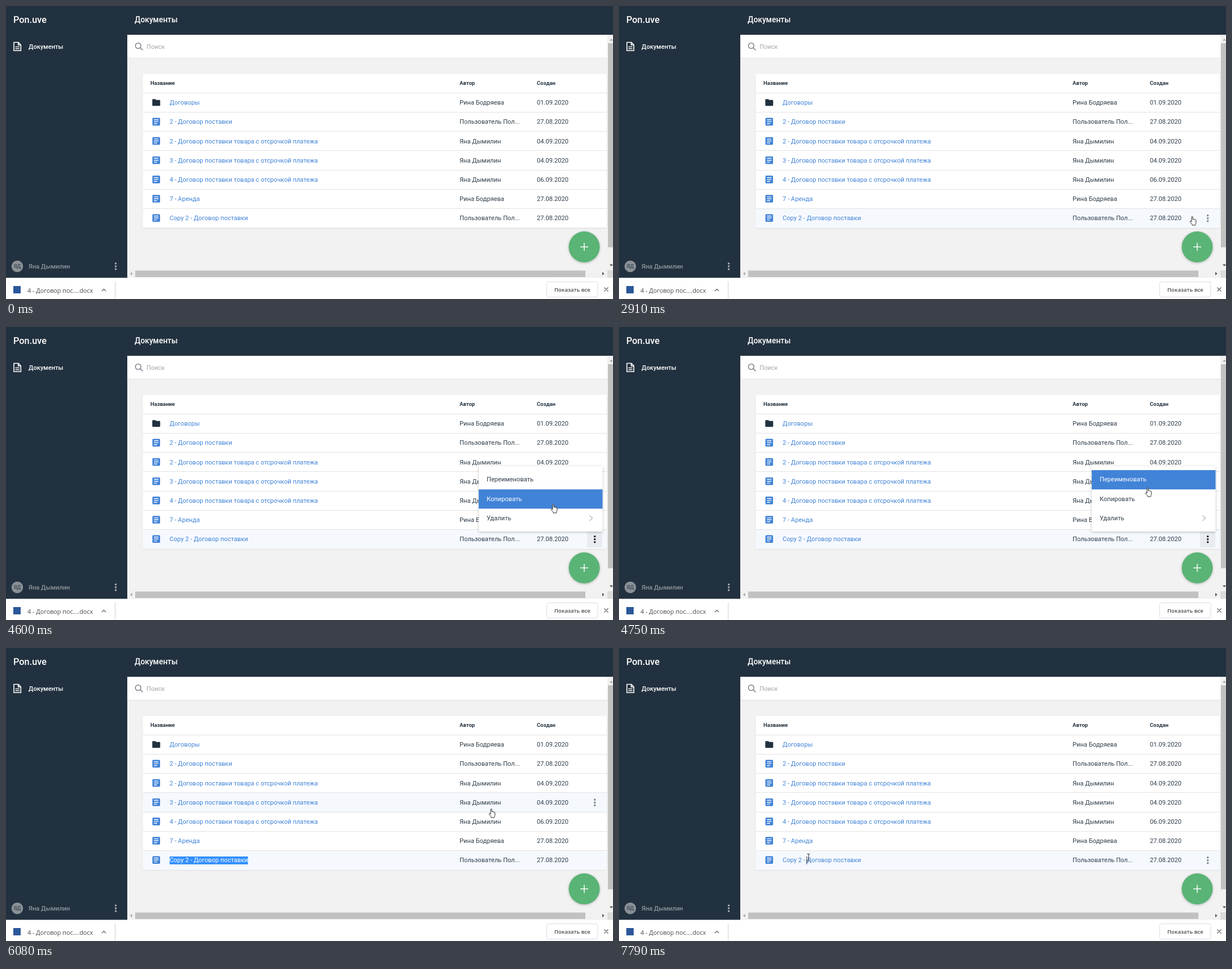
An HTML page that plays this animation: 1076 by 520 pixels, repeating every 8 s.

```html
<!DOCTYPE html>
<html lang="ru">
<head>
<meta charset="utf-8">
<title>Документы</title>
<style>
  html, body { margin: 0; width: 100%; height: 100%; overflow: hidden; background: #fff; }
  svg { display: block; width: 1076px; height: 520px; font: 11.15px Roboto, sans-serif; fill: #22313f; }
  .medium { font-weight: 500; }
  .head { font-size: 9.5px; font-weight: 700; }
  .cell { fill: #303e4b; }
  .link { fill: #4183d7; }
  .line { fill: none; stroke-width: 1.3; }
  .chrome { font-family: "Open Sans", sans-serif; fill: #45494d; }
  .shadow { filter: drop-shadow(0 1px 2px rgba(0, 0, 0, .25)); }
  .cursor { fill: #fff; stroke: #111; stroke-width: .9; stroke-linejoin: round; }
</style>
</head>
<body>
<svg viewBox="0 0 1076 520">
  <defs>
    <g id="dots"><circle cy="-5" r="1.75"/><circle r="1.75"/><circle cy="5" r="1.75"/></g>
    <g id="article">
      <rect x="-6.8" y="-6.8" width="13.6" height="13.6" rx="1.6" fill="#4183d7"/>
      <path d="M-4-3.4H4M-4 0H4M-4 3.4H1.5" stroke="#fff" stroke-width="1.4"/>
    </g>
    <path id="folder" d="M-7-4.6Q-7-6-5.6-6H-1.6L0-4.4H5.6Q7-4.4 7-3V4.5Q7 6 5.6 6H-5.6Q-7 6-7 4.5Z"/>
  </defs>

  <!-- page frame -->
  <rect width="1076" height="483" fill="#22313f"/>
  <rect x="215" y="51.3" width="861" height="432" fill="#f2f2f2"/>
  <rect x="215" y="51.3" width="851" height="41.2" fill="#fff"/>
  <path d="M215 92.5H1066" stroke="#e2e2e2"/>
  <g fill="#fff" class="medium">
    <text x="13" y="30" font-size="16.3">Pon.uve</text>
    <text x="228" y="28.7" font-size="13.8">Документы</text>
    <text x="40" y="76">Документы</text>
  </g>
  <path class="line" stroke="#fff" style="stroke-width:1.6" d="M14 64.5H22L26.3 69V79.3H14ZM21.7 64.5V69.3H26.3M16.5 72.5H23.8M16.5 75.8H23.8"/>
  <circle cx="20" cy="462" r="10.3" fill="#8a9096"/>
  <text x="20" y="465.4" font-size="9" text-anchor="middle">ЯД</text>
  <text class="medium" x="40" y="466" fill="#8d959c">Яна Дымилин</text>
  <use href="#dots" x="194.5" y="462" fill="#abb1b7"/>
  <g class="line" stroke="#69727b"><circle cx="234.3" cy="70.5" r="4.9"/><path d="M238 74.2L242.5 78.5"/></g>
  <text x="249" y="76" fill="#a2a7ac">Поиск</text>

  <!-- table -->
  <rect x="242.5" y="120.5" width="822.5" height="273" fill="#fff" style="filter:drop-shadow(0 1px 1px rgba(0,0,0,.1))"/>
  <g class="head">
    <text x="256" y="140.3">Название</text><text x="804" y="140.3">Автор</text><text x="941" y="140.3">Создан</text>
  </g>
  <g id="rows"></g>
  <rect id="selection" y="370" height="14" fill="#3390ff"/>
  <text id="edited" class="link" x="290" y="380.4">Copy 2 - Договор поставки</text>
  <path id="caret" stroke="#333" d="M0 370V384"/>
  <rect id="shade" x="1030" y="363" width="27" height="28" rx="2" fill="#e8ecf1"/>
  <use id="kebab" href="#dots" x="1043.7"/>
  <circle class="shadow" cx="1025" cy="427.6" r="27.5" fill="#5ab476"/>
  <path d="M1018 427.5H1032M1025 420.5V434.5" stroke="#fff" stroke-width="1.5"/>

  <!-- scrollbars -->
  <path fill="#f1f1f1" d="M1066 51.3H1076V469H1066ZM215 469H1066V483H215Z"/>
  <path fill="#dcdcdc" d="M1066 469H1076V483H1066Z"/>
  <path fill="#c1c1c1" d="M1067 66H1076V428.3H1067ZM229 469.5H1027V481H229Z"/>
  <path fill="#a3a3a3" d="M1070 61.5L1073 58L1076 61.5ZM223.5 472L220 475L223.5 478Z"/>
  <path fill="#505050" d="M1070 458.5L1073 462L1076 458.5ZM1057 472L1060.5 475L1057 478Z"/>

  <!-- context menu -->
  <g id="menu">
    <rect class="shadow" x="838" y="247" width="219.5" height="116" fill="#fff"/>
    <rect id="highlight" x="838" width="219.5" height="34.2" fill="#4183d7"/>
    <g id="items" class="cell">
      <text x="852" y="274.4">Переименовать</text>
      <text x="852" y="308.6">Копировать</text>
      <text x="852" y="342.8">Удалить</text>
    </g>
    <path class="line" stroke="#b5b9bd" d="M1034.5 334.5L1039.5 339.3L1034.5 344"/>
  </g>

  <!-- downloads bar -->
  <rect y="482.4" width="1076" height="38" fill="#fff"/>
  <rect x="13" y="497" width="13" height="13" fill="#2b579a"/>
  <g class="chrome">
    <text x="38" y="509" font-size="10.8">4 - Договор пос....docx</text>
    <rect x="958.5" y="489.5" width="90.5" height="27" rx="3" fill="#fff" stroke="#dadce0"/>
    <text x="972" y="506.5" font-size="9.6" font-weight="600">Показать все</text>
  </g>
  <path stroke="#d0d0d0" d="M193.5 489V519"/>
  <path class="line" stroke="#5f6368" d="M170 506L173.5 502.5L177 506M1060.5 499.5L1067.5 506.5M1067.5 499.5L1060.5 506.5"/>

  <path id="cursor" class="cursor"/>
</svg>
<script>
const LOOP = 8000, TOP = 154.4, ROW = 34.17, LAST = 6;
const $ = id => document.getElementById(id);
const set = (id, attrs) => { for (const k in attrs) $(id).setAttribute(k, attrs[k]); };
const show = (id, on) => set(id, { opacity: on ? 1 : 0 });

const AUTHORS = ['Рина Бодряева', 'Пользователь Пол...', 'Яна Дымилин'];
const DOCS = [
  ['Договоры', 0, '01.09'],
  ['2 - Договор поставки', 1, '27.08'],
  ['2 - Договор поставки товара с отсрочкой платежа', 2, '04.09'],
  ['3 - Договор поставки товара с отсрочкой платежа', 2, '04.09'],
  ['4 - Договор поставки товара с отсрочкой платежа', 2, '06.09'],
  ['7 - Аренда', 0, '27.08'],
  ['', 1, '27.08']
];
$('rows').innerHTML = DOCS.map(([name, author, date], i) => {
  const y = TOP + ROW * i, mid = y + ROW / 2, base = mid + 3.8;
  return `<rect id="row${i}" x="242.5" y="${y}" width="822.5" height="${ROW}" fill="#f5f9fe"/>
    <path d="M242.5 ${Math.floor(y) + .5}H1065" stroke="#e2e2e2"/>
    <use href="#${i ? 'article' : 'folder'}" x="266.3" y="${mid - .3}"/>
    <text class="link" x="290" y="${base}">${name}</text>
    <text class="cell" x="804" y="${base}">${AUTHORS[author]}</text>
    <text class="cell" x="941" y="${base}">${date}.2020</text>`;
}).join('');

// Pointer moves: start, end, number of steps, evenly timed points
const MOVES = [
  [1430, 1990, 8, [[968, 499], [958, 462], [938, 412], [931, 383]]],
  [2220, 2220, 1, [[932, 383]]],
  [2520, 3290, 11, [[938, 382], [1016, 373], [1043, 371]]],
  [3370, 3520, 3, [[1048, 380], [1045, 376]]],
  [4290, 5060, 11, [[1042, 372], [1015, 352], [970, 314], [937, 285], [928, 273], [925, 266]]],
  [5210, 5210, 1, [[916, 263]]],
  [6080, 6860, 11, [[860, 285], [770, 325], [650, 362], [530, 386], [420, 387], [371, 382]]],
  [6940, 7090, 3, [[358, 378], [340, 373], [336, 371]]]
];
const CURSORS = {
  arrow: { dx: 0, dy: 0, d: 'M0 0V11.6L2.7 9L4.4 13L6.2 12.2L4.5 8.3H8.1Z' },
  hand: { dx: -4, dy: 0, d: 'M3 10V1.6C3 .2 5.2 .2 5.2 1.6V6C5.4 5 7 5.1 7.1 6.2C7.4 5.4 8.9 5.6 9 6.7C9.4 6.1 10.8 6.3 10.8 7.4V11C10.8 13 9.6 13.6 9.6 16H4.2C4.2 14 2 12.6 .6 10.2C-.2 8.8 1.4 7.8 2.2 8.9Z' },
  beam: { dx: 0, dy: -6, d: 'M-2.5 .5H-.8L0 1.2L.8 .5H2.5M0 1.2V11.3M-2.5 12H-.8L0 11.3L.8 12H2.5' }
};

function pointerAt(t) {
  const move = MOVES.filter(m => m[0] <= t).pop();
  if (!move) return null;
  const [start, end, steps, pts] = move;
  const gap = (end - start) / (steps - 1) || 1;
  const step = Math.min(steps - 1, Math.floor((t - start + 5) / gap));
  const pos = steps > 1 ? step / (steps - 1) * (pts.length - 1) : 0;
  const i = Math.floor(pos), a = pts[i], b = pts[i + 1] || a;
  return a.map((v, k) => v + (b[k] - v) * (pos - i));
}

function menuOpacity(t) {
  if (t < 3700 || t >= 5470) return 0;
  return t < 3830 || t >= 5380 ? .5 : 1;
}

function draw(t) {
  const p = pointerAt(t), [x, y] = p || [0, 0];
  const opacity = menuOpacity(t), open = opacity > 0;
  const editing = t >= 5380, selected = editing && t < 7640;
  const overMenu = open && x > 838 && y > 247 && y < 363;
  const item = overMenu ? Math.floor((y - 254) / 34.2) : -1;
  const hovered = open ? LAST : Math.floor((y - TOP) / ROW);
  const inTable = p && hovered >= 0 && hovered <= LAST;
  const onKebab = x > 1030 && hovered === LAST;

  DOCS.forEach((_, i) => show('row' + i, inTable && i === hovered || editing && i === LAST));
  show('kebab', inTable);
  set('kebab', { y: TOP + ROW * (hovered + .5) + .3, fill: open || onKebab ? '#222' : '#80868b' });
  show('shade', open);

  set('menu', { opacity });
  show('highlight', item >= 0);
  set('highlight', { y: 254 + 34.2 * item });
  [...$('items').children].forEach((el, i) => { el.style.fill = i === item ? '#fff' : ''; });

  const title = $('edited');
  show('selection', selected);
  set('selection', { x: 290, width: title.getComputedTextLength() });
  title.style.fill = selected ? '#fff' : '';
  show('caret', t >= 7640);
  set('caret', { transform: `translate(${290 + title.getSubStringLength(0, 9)})` });

  const overTitle = editing && hovered === LAST && x < 430;
  const kind = overTitle ? 'beam' : overMenu || inTable && !onKebab ? 'hand' : 'arrow';
  const { dx, dy, d } = CURSORS[kind];
  show('cursor', p);
  set('cursor', { d, transform: `translate(${Math.round(x + dx)} ${Math.round(y + dy)})` });
  $('cursor').style.fill = kind === 'beam' ? 'none' : '';
}

function tick() {
  draw(performance.now() % LOOP);
  requestAnimationFrame(tick);
}
tick();
</script>
</body>
</html>
```
